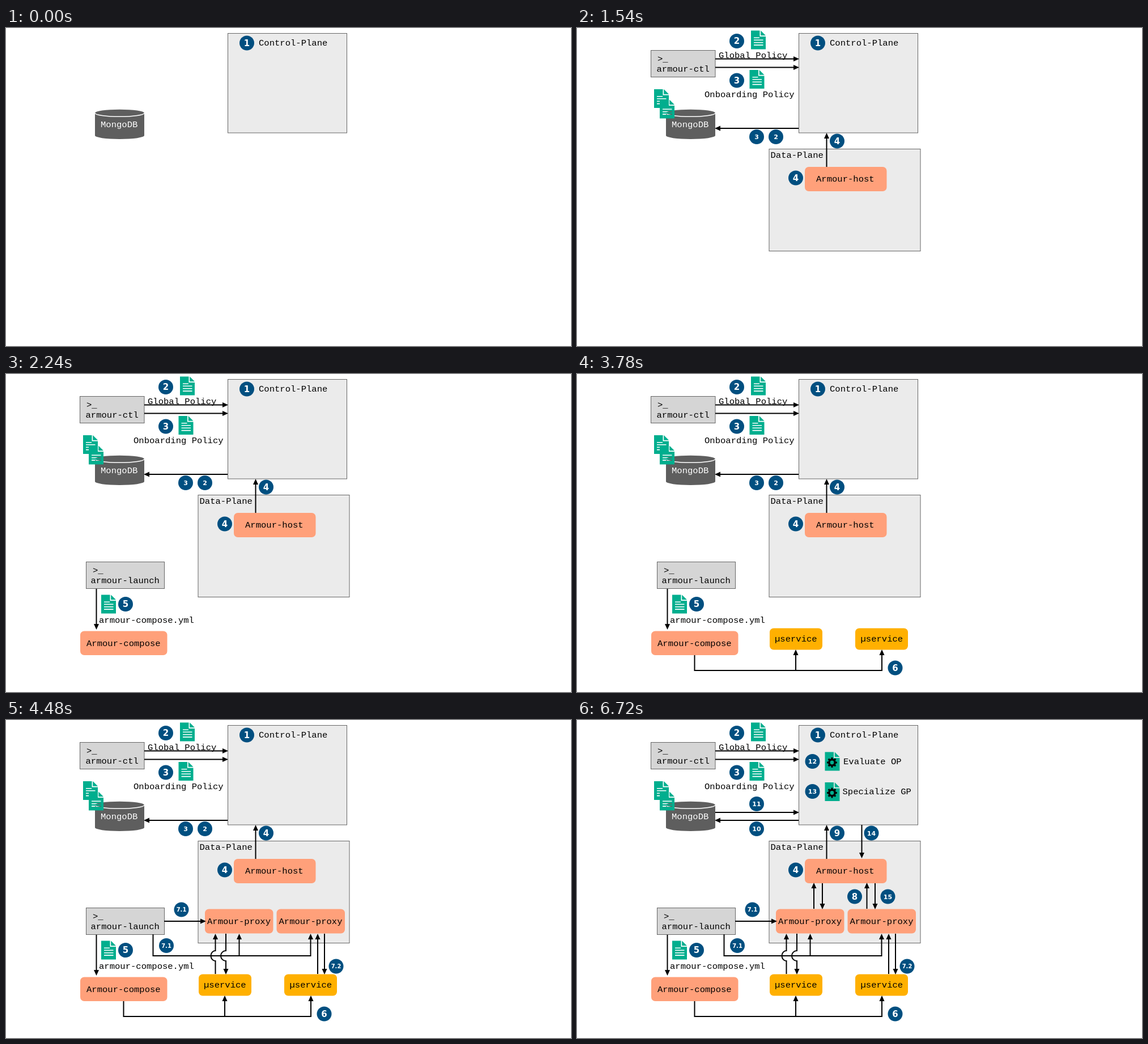
An HTML page for the animation above (7490 ms loop, 997 by 561 pixels).

```html
<!DOCTYPE html>
<html lang="en">
<head>
<meta charset="utf-8">
<title>Control plane and data plane</title>
<style>
  html, body { margin: 0; width: 100%; height: 100%; overflow: hidden; background: #fff; }
  svg { display: block; width: 100%; height: 100%; }
  text { font: 15.55px "Liberation Mono", "Courier New", monospace; white-space: pre; }
  .badge circle { fill: #004f80; }
  .badge text { font-family: "DejaVu Sans", Verdana, sans-serif; font-weight: bold; fill: #fff; text-anchor: middle; }
  .arrow { fill: none; stroke: #000; stroke-width: 2; marker-end: url(#head); }
  .panel { fill: #ebebeb; stroke: #666; }
  .terminal { fill: #d5d5d5; stroke: #666; }
  .salmon { fill: #ffa07a; }
  .amber { fill: #ffb000; }
  .doc { fill: #00ae8e; fill-rule: evenodd; }
  .gear { fill: none; stroke: #000; }
</style>
</head>
<body>
<svg id="stage" viewBox="0 0 997 561">
  <defs>
    <marker id="head" markerUnits="userSpaceOnUse" markerWidth="10" markerHeight="10" refX="1" refY="5" orient="auto">
      <path d="M0 .5L10 5L0 9.5Z"/>
    </marker>
    <path id="doc" class="doc" d="M0 0H15.5V10.5H26V33H0ZM17.2 0L26 8.8H17.2Z
      M5 12H15V13.6H5ZM5 16H21.5V17.6H5ZM5 20.4H21.5V22H5ZM5 24.8H21.5V26.4H5Z"/>
    <g id="gearDoc">
      <path class="doc" d="M0 0H15.5V10.5H26V33H0ZM17.2 0L26 8.8H17.2Z"/>
      <circle class="gear" cx="12.5" cy="18.5" r="5.2" stroke-width="3.6"/>
      <circle class="gear" cx="12.5" cy="18.5" r="7.6" stroke-width="2.6" pathLength="16" stroke-dasharray="1" stroke-dashoffset=".5"/>
    </g>
  </defs>
</svg>
<script>
const LOOP = 7490;
const svg = document.getElementById('stage');
const sheet = document.head.appendChild(document.createElement('style')).sheet;

const label = (x, y, text, fill = '#000') => `<text x="${x}" y="${y}" fill="${fill}">${text}</text>`;
const box = (kind, x, y, right, bottom, rx = 0) =>
  `<rect class="${kind}" x="${x}" y="${y}" width="${right - x}" height="${bottom - y}" rx="${rx}"/>`;
const pill = (kind, x, y, right, bottom, textX, textY, text) =>
  box(kind, x, y, right, bottom, 7) + label(textX, textY, text);
const arrows = (...paths) => paths.map(d => `<path class="arrow" d="${d}"/>`).join('');
const icon = (id, x, y) => `<use href="#${id}" x="${x}" y="${y}"/>`;
const badge = (x, y, text, size = 15) =>
  `<g class="badge"><circle cx="${x}" cy="${y}" r="13"/>` +
  `<text x="${x}" y="${y + size * .365}" style="font-size:${size}px">${text}</text></g>`;

// Shows a group between two times of the loop, with hard cuts.
function show(from, to, ...parts) {
  const group = document.createElementNS(svg.namespaceURI, 'g');
  group.innerHTML = parts.join('');
  svg.append(group);
  if (from === 0) return;
  const name = `show-${from}-${to}`;
  const end = to < LOOP ? `${to / LOOP * 100}% { visibility: hidden }` : '';
  sheet.insertRule(`@keyframes ${name} {
    0% { visibility: hidden } ${from / LOOP * 100}% { visibility: visible } ${end}
    100% { visibility: ${end ? 'hidden' : 'visible'} } }`);
  group.style.animation = `${name} ${LOOP}ms step-end infinite`;
}

show(0, LOOP,
  box('panel', 391.5, 9.5, 601.5, 185),
  badge(425, 26.5, 1), label(446, 31, 'Control-Plane'),
  '<path fill="#5e5e5e" d="M157 150A43.5 6.3 0 0 1 244 150V189.7A43.5 6.3 0 0 1 157 189.7Z"/>',
  '<path fill="none" stroke="#fff" stroke-width="1.5" d="M157 150A43.5 6.3 0 0 0 244 150"/>',
  label(167, 174.5, 'MongoDB', '#fff'));

show(770, LOOP,
  box('terminal', 130.5, 39.5, 244, 86.5),
  label(142, 59, '&gt;_'), label(140.5, 76.5, 'armour-ctl'),
  badge(282, 23, 2), icon('doc', 307, 4.5), label(250, 52.5, 'Global Policy'),
  badge(282, 92.5, 3), icon('doc', 304.5, 74), label(225, 122, 'Onboarding Policy'),
  arrows('M244 54.5H383', 'M244 69.5H383', 'M391 177H252'),
  icon('doc', 136, 108), icon('doc', 146, 126.5));

show(770, 6020, badge(317, 192, 3, 11), badge(351, 192, 2, 11));

show(1540, LOOP,
  box('panel', 339, 213.5, 606, 393.5), label(341.5, 229, 'Data-Plane'),
  arrows('M440.5 245V194'),
  pill('salmon', 402, 245, 546.5, 288, 422, 271, 'Armour-host'),
  badge(386, 264.5, 4));

show(1540, 5250, badge(459, 199.5, 4));

show(2240, LOOP,
  box('terminal', 141.5, 331.5, 279.5, 378.5),
  label(153, 350.5, '&gt;_'), label(149.5, 368.5, 'armour-launch'),
  arrows('M159.5 379V442'),
  icon('doc', 168, 389.5), badge(211, 406, 5), label(164, 439, 'armour-compose.yml'),
  pill('salmon', 131, 453.5, 284.5, 496, 142, 479.5, 'Armour-compose'));

show(3780, LOOP,
  pill('amber', 340, 448.5, 433, 486.5, 349, 471.5, 'µservice'),
  pill('amber', 491, 448.5, 584, 486.5, 500.5, 471.5, 'µservice'),
  arrows('M207.5 496V523H538V495', 'M386 523V495'),
  badge(561.5, 518.5, 6));

show(4480, LOOP,
  pill('salmon', 351, 333.5, 471.5, 376.5, 355, 360, 'Armour-proxy'),
  pill('salmon', 477.5, 333.5, 598, 376.5, 481.5, 360, 'Armour-proxy'),
  arrows('M279 355H344', 'M259.5 378V416H537.5V386', 'M411.5 416V386',
    'M369.5 448V425A8 9 0 0 1 369.5 407V386', 'M388 377V407A9 9 0 0 0 388 425V440',
    'M550 448V386', 'M562 377V440'),
  badge(309.5, 334.5, '7.1', 10), badge(283, 398, '7.1', 10), badge(582.5, 434.5, '7.2', 10));

show(5250, LOOP,
  arrows('M418 333V296', 'M511.5 333V296'),
  badge(490, 311.5, 8), badge(459, 199.5, 9));

show(6020, LOOP,
  arrows('M244 163H383'),
  badge(317, 148, 11, 11), badge(317, 192, 10, 11),
  badge(415.5, 73, 12, 11), icon('gearDoc', 437.5, 56.5), label(470, 78, 'Evaluate OP'),
  badge(415.5, 126, 13, 11), icon('gearDoc', 437.5, 110), label(468.5, 131, 'Specialize GP'));

show(6720, LOOP,
  arrows('M433 288V325', 'M526 288V325', 'M502.5 185V235'),
  badge(519.5, 199.5, 14, 11), badge(548.5, 311.5, 15, 11));
</script>
</body>
</html>
```
